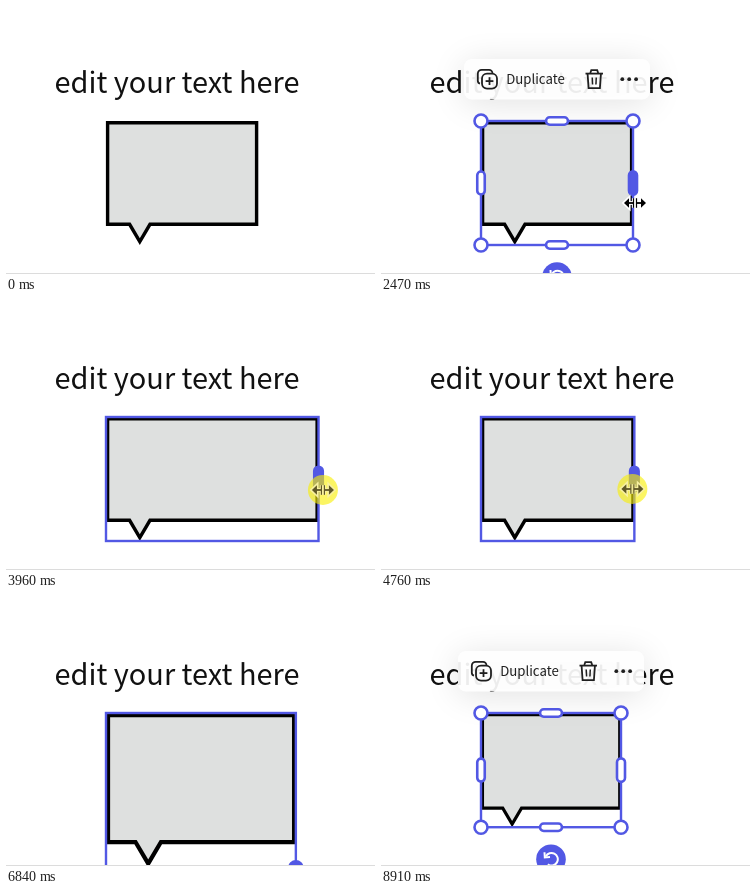
An HTML page with a canvas that plays this animation: 369x268 px, repeating every 9.44 s.

```html
<!DOCTYPE html>
<html lang="en">
<head>
<meta charset="utf-8">
<title>Resizing a speech bubble</title>
<style>
html, body { margin: 0; width: 100%; height: 100%; overflow: hidden; background: #fff; }
canvas { display: block; width: 369px; height: 268px; }
</style>
</head>
<body>
<canvas id="stage"></canvas>
<script>
const W = 369, H = 268, LOOP = 9440, TICK = 67.05;
const BLUE = '#5258e4', INK = '#1f1f1f';
const FONT = '"Noto Sans CJK SC", "Noto Sans CJK JP", "Noto Sans CJK", "Noto Sans", sans-serif';
const LEFT = 100, TOP = 115, BASE_W = 152, BASE_H = 124;

const canvas = document.getElementById('stage');
const ctx = canvas.getContext('2d');
const dpr = window.devicePixelRatio || 1;
canvas.width = W * dpr;
canvas.height = H * dpr;

const within = (t, from, to) => t >= from && t < to;
const smooth = p => p * p * (3 - 2 * p);

// Eased value along [time, ...values] stops
function track(t, stops) {
  if (t <= stops[0][0]) return stops[0].slice(1);
  for (let i = 1; i < stops.length; i++) {
    const a = stops[i - 1], b = stops[i];
    if (t <= b[0]) {
      const p = smooth((t - a[0]) / (b[0] - a[0]));
      return a.slice(1).map((v, k) => v + (b[k + 1] - v) * p);
    }
  }
  return stops[stops.length - 1].slice(1);
}

const capture = t => 860 + Math.floor((t - 852) / TICK) * TICK;

const ENTER = [[830, 168, 224], [1060, 135, 148]];
const TO_SIDE = [[1880, 135, 148], [2340, 245, 219], [2470, 254, 197], [2740, 253, 188]];
const SIDE_DRAG = [[3200, 252], [4020, 314], [4160, 314], [4760, 253.3], [5030, 252]];
const SIDE_POINTER = [[3200, 253, 188], [3960, 317, 188], [4150, 318, 188], [4760, 251.3, 187], [5030, 251.3, 187]];
const TO_CORNER = [[5160, 252, 187], [5360, 252, 245]];
const CORNER_DRAG = [[6490, 252], [6840, 290], [6980, 290], [7680, 240]];
const LEAVE = [[8200, 241, 245], [8320, 278, 262]];

function boxAt(t) {
  if (t < 6300) {
    const right = track(t, SIDE_DRAG)[0];
    return { right, bottom: TOP + BASE_H, scale: 1 };
  }
  const right = track(t, CORNER_DRAG)[0];
  const scale = (right - LEFT) / BASE_W;
  return { right, bottom: TOP + BASE_H * scale, scale };
}

function path(points, close) {
  ctx.beginPath();
  points.forEach(([x, y]) => ctx.lineTo(x, y));
  if (close) ctx.closePath();
}

function line(...points) {
  path(points);
  ctx.stroke();
}

function circle(x, y, r) {
  ctx.beginPath();
  ctx.arc(x, y, r, 0, Math.PI * 2);
}

function rounded(x, y, w, h, r) {
  ctx.beginPath();
  ctx.roundRect(x, y, w, h, r);
}

function pen(color, width) {
  ctx.strokeStyle = color;
  ctx.lineWidth = width;
}

function label(text, x, y, font, color) {
  ctx.font = font + ' ' + FONT;
  ctx.fillStyle = color;
  ctx.fillText(text, x, y);
}

function drawBubble({ right, scale: s }) {
  const x = v => LEFT + v * s, y = v => TOP + v * s;
  const r = right - 1.4 * s;
  path([[x(1.6), y(1.7)], [r, y(1.7)], [r, y(103.3)], [x(44), y(103.3)],
        [x(33.8), y(120.6)], [x(23.6), y(103.3)], [x(1.6), y(103.3)]], true);
  ctx.fillStyle = '#dee0df';
  ctx.fill();
  pen('#000', 3.4 * s);
  ctx.stroke();
}

function drawOutline({ right, bottom }) {
  pen(BLUE, 2.4);
  ctx.strokeRect(LEFT, TOP, right - LEFT, bottom - TOP);
}

function knob(x, y, active) {
  circle(x, y, 6.5);
  fillHandle(active);
}

function pill(x, y, w, h, active) {
  rounded(x - w / 2, y - h / 2, w, h, Math.min(w, h) / 2);
  fillHandle(active);
}

function fillHandle(active) {
  ctx.fillStyle = active ? BLUE : '#fff';
  ctx.fill();
  pen(BLUE, 2.6);
  ctx.stroke();
}

function drawRotate(x, y) {
  circle(x, y, 14.8);
  ctx.fillStyle = BLUE;
  ctx.fill();
  pen('#fff', 2);
  ctx.beginPath();
  ctx.arc(x + 0.5, y, 6.3, -Math.PI * 0.85, Math.PI * 0.7);
  ctx.stroke();
  line([x - 6.5, y - 7], [x - 6.2, y - 1.8], [x - 1, y - 2.2]);
}

function drawHandles({ right, bottom }, active) {
  const cx = (LEFT + right) / 2, cy = (TOP + bottom) / 2;
  drawRotate(cx, bottom + 32);
  for (const y of [TOP, bottom]) {
    pill(cx, y, 22, 7.5);
    knob(LEFT, y);
    knob(right, y, active === 'corner' && y === bottom);
  }
  pill(LEFT, cy, 7.5, 23);
  pill(right, cy, 8, 23.5, active === 'side');
}

function drawToolbar(cx, alpha) {
  ctx.save();
  ctx.globalAlpha = alpha;
  ctx.translate(cx - 93, 53);

  ctx.save();
  ctx.shadowColor = 'rgba(0,0,0,0.13)';
  ctx.shadowBlur = 34 * dpr;
  ctx.shadowOffsetY = 4 * dpr;
  rounded(0, 0, 186, 40.5, 8);
  ctx.fillStyle = 'rgba(255,255,255,0.92)';
  ctx.fill();
  ctx.restore();

  // Duplicate
  pen(INK, 1.8);
  ctx.beginPath();
  ctx.moveTo(15.5, 24.5);
  ctx.arcTo(13.8, 24, 13.8, 19, 3);
  ctx.arcTo(13.8, 10.8, 20, 10.8, 4);
  ctx.arcTo(28.5, 10.8, 28.5, 14, 3.5);
  ctx.stroke();
  rounded(18, 14.6, 15, 15, 5);
  ctx.stroke();
  line([25.5, 18.2], [25.5, 26]);
  line([21.6, 22.1], [29.4, 22.1]);
  label('Duplicate', 42.2, 25, '500 13.2px', INK);

  // Delete
  line([121.5, 14.6], [139, 14.6]);
  line([126.3, 14], [127.3, 11.2], [133.2, 11.2], [134.2, 14]);
  line([123.6, 15], [124.6, 29.2], [135.9, 29.2], [136.9, 15]);
  pen(INK, 1.5);
  line([128.2, 18.5], [128.6, 25.5]);
  line([132.3, 18.5], [131.9, 25.5]);

  // More
  ctx.fillStyle = INK;
  for (const x of [158.3, 165.2, 172.1]) {
    circle(x, 20.2, 1.9);
    ctx.fill();
  }
  ctx.restore();
}

function drawArrow(x, y) {
  path([[0, 0], [0, 15], [3.5, 11.8], [6, 17.4], [8.6, 16.2], [6.2, 10.8], [11, 10.8]]
    .map(([dx, dy]) => [x + dx, y + dy]), true);
  pen('#fff', 2);
  ctx.stroke();
  ctx.fillStyle = '#000';
  ctx.fill();
}

function drawResize(x, y, angle, pressed) {
  const color = pressed ? '#5f5826' : '#000';
  const halo = pressed ? '#f7f0a0' : '#fff';
  ctx.save();
  ctx.translate(x, y);
  ctx.rotate(angle);
  const bar = angle ? 2.2 : 4.8;
  for (const [ink, extra] of [[halo, 2], [color, 0]]) {
    for (const side of [-1, 1]) {
      pen(ink, 1.8 + extra);
      line([side * 1.5, 0], [side * 8, 0]);
      pen(ink, 1.2 + extra);
      line([side * 1.5, -bar], [side * 1.5, bar]);
      path([[side * 11, 0], [side * 6, -4.8], [side * 6, 4.8]], true);
      ctx.fillStyle = ink;
      ctx.fill();
      if (extra) ctx.stroke();
    }
  }
  ctx.restore();
}

function drawPress(x, y) {
  circle(x, y, 15);
  ctx.fillStyle = 'rgba(249,238,0,0.61)';
  ctx.fill();
}

function drawPointer(t, m, box) {
  const diagonal = Math.PI / 4;
  if (within(t, 860, 1930)) {
    const [x, y] = track(m, ENTER);
    if (within(t, 1390, 1670)) drawPress(x, y);
    drawArrow(x, y);
  } else if (within(t, 1930, 3010)) {
    const [x, y] = track(m, TO_SIDE);
    if (t < 2400) drawArrow(x, y);
    else drawResize(x, y, 0);
  } else if (within(t, 3010, 5160)) {
    const [x, y] = track(m, SIDE_POINTER);
    drawPress(x, y);
    drawResize(x, y, 0, true);
  } else if (within(t, 5160, 6160)) {
    const [x, y] = track(m, TO_CORNER);
    drawResize(x, y, t < 5290 ? 0 : diagonal);
  } else if (within(t, 6160, 6300)) {
    drawResize(258, 249, diagonal);
  } else if (within(t, 6300, 7910)) {
    const x = box.right + 3.7, y = box.bottom + 13;
    drawPress(x, y);
    drawResize(x, y, diagonal, true);
  } else if (within(t, 7910, 8310)) {
    drawArrow(...track(m, LEAVE));
  }
}

function draw(t) {
  const m = capture(t);
  const box = boxAt(m);
  const sideDrag = within(t, 3010, 5160), cornerDrag = within(t, 6300, 7910);
  const dragging = sideDrag || cornerDrag;
  const toolbar = t >= 1390 && !within(t, 3270, 5160) && !within(t, 6560, 7910);

  ctx.setTransform(dpr, 0, 0, dpr, 0, 0);
  ctx.fillStyle = '#fff';
  ctx.fillRect(0, 0, W, H);
  ctx.lineCap = 'butt';
  ctx.lineJoin = 'miter';

  ctx.save();
  ctx.beginPath();
  ctx.rect(0, 0, W, 267);
  ctx.clip();
  label('edit your text here', 48.5, 87, '400 28.95px', '#111');
  drawBubble(box);
  if (toolbar) {
    const fading = within(t, 1390, 1460) || within(t, 7910, 7970);
    drawToolbar((LEFT + box.right) / 2, fading ? 0.6 : 1);
  }
  if (t >= 860) drawOutline(box);
  if (sideDrag) pill(box.right, (TOP + box.bottom) / 2, 8.5, 24.5, true);
  if (cornerDrag) knob(box.right, box.bottom, true);
  if (t >= 1390 && !dragging) {
    const active = within(t, 2400, 5230) ? 'side' : within(t, 5290, 6300) ? 'corner' : '';
    drawHandles(box, active);
  }
  ctx.restore();

  ctx.fillStyle = '#dcdcdc';
  ctx.fillRect(0, 267, W, 1);
  drawPointer(t, m, box);
}

const start = performance.now();
function frame() {
  draw((performance.now() - start) % LOOP);
  requestAnimationFrame(frame);
}
frame();
</script>
</body>
</html>
```
